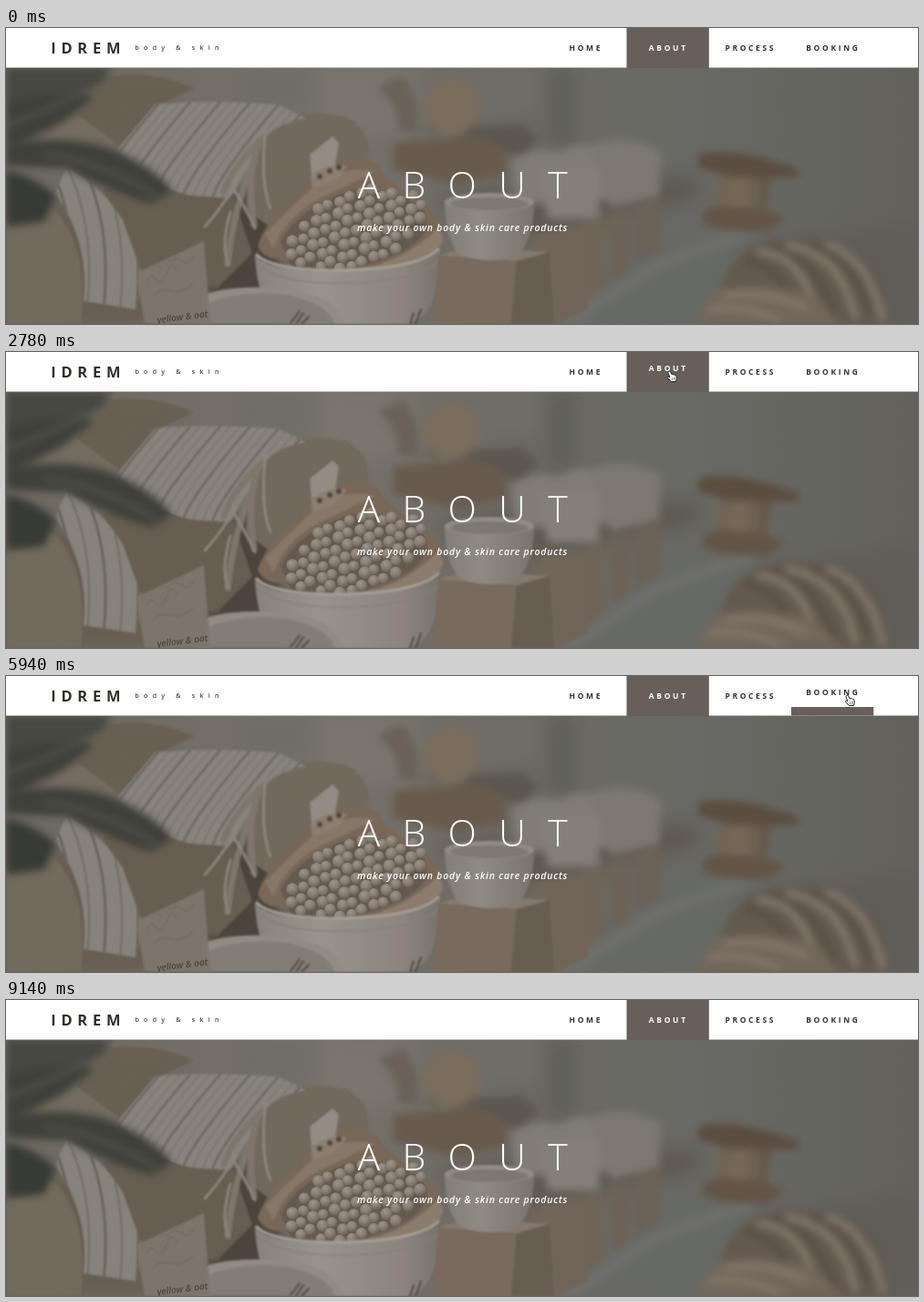
These frames come from a looping animation (1000x325 px, 9.16 s). An HTML page:

```html
<!DOCTYPE html>
<html lang="en">
<head>
<meta charset="utf-8">
<title>Body and skin: about</title>
<style>
  html, body { margin: 0; width: 100%; height: 100%; overflow: hidden; background: #67665f; }
  svg { display: block; width: 100%; height: 100%; }
  text { font-family: "Open Sans", sans-serif; }
  .photo { filter: saturate(.75) brightness(.95); }
  .logo { font-size: 16.5px; font-weight: 700; letter-spacing: 5.7px; fill: #33302a; }
  .claim { font-size: 7px; font-weight: 600; letter-spacing: 5.25px; fill: #494640; }
  .nav text { font-size: 8.5px; font-weight: 700; letter-spacing: 2.65px; fill: #33312d; }
  .nav .active text { fill: #fff; }
  .title { font-size: 41px; font-weight: 300; letter-spacing: 24.4px; fill: #fff; }
  .sub { font-size: 10.5px; font-weight: 600; font-style: italic; letter-spacing: .81px; fill: #fff; }
  .note { font-size: 10px; font-weight: 600; font-style: italic; fill: #514a42; }
  .line { fill: none; stroke-linecap: round; }
</style>
</head>
<body>
<svg viewBox="0 0 1000 325" preserveAspectRatio="none">
  <defs>
    <filter id="soft" x="-20%" y="-20%" width="140%" height="140%" color-interpolation-filters="sRGB"><feGaussianBlur stdDeviation="1.2"/></filter>
    <filter id="blur" x="-20%" y="-20%" width="140%" height="140%" color-interpolation-filters="sRGB"><feGaussianBlur stdDeviation="4"/></filter>
    <filter id="haze" x="-20%" y="-20%" width="140%" height="140%" color-interpolation-filters="sRGB"><feGaussianBlur stdDeviation="10"/></filter>
    <linearGradient id="wall">
      <stop offset="0" stop-color="#6d685f"/><stop offset=".35" stop-color="#76716a"/>
      <stop offset=".58" stop-color="#6b6962"/><stop offset=".75" stop-color="#696a65"/>
      <stop offset="1" stop-color="#62615b"/>
    </linearGradient>
    <linearGradient id="bowl">
      <stop offset="0" stop-color="#91897f"/><stop offset=".35" stop-color="#a19a90"/>
      <stop offset=".8" stop-color="#948c82"/><stop offset="1" stop-color="#81796f"/>
    </linearGradient>
    <linearGradient id="jar">
      <stop offset="0" stop-color="#8b847a"/><stop offset=".4" stop-color="#989187"/>
      <stop offset="1" stop-color="#827a70"/>
    </linearGradient>
    <linearGradient id="spool">
      <stop offset="0" stop-color="#786650"/><stop offset=".45" stop-color="#836f58"/>
      <stop offset="1" stop-color="#665744"/>
    </linearGradient>
    <radialGradient id="knob" cx=".4" cy=".3" r=".7">
      <stop offset="0" stop-color="#a89c8e"/><stop offset=".55" stop-color="#928475"/>
      <stop offset="1" stop-color="#766858"/>
    </radialGradient>
    <pattern id="weave" width="5" height="4" patternUnits="userSpaceOnUse" patternTransform="rotate(-18)">
      <path d="M0 1h3M2 3h3" stroke="#50483d" stroke-opacity=".28"/>
      <path d="M1 2h3" stroke="#a1947f" stroke-opacity=".25"/>
    </pattern>
    <clipPath id="hero"><path d="M0 43.5H1000V325H0z"/></clipPath>
    <clipPath id="towelShape"><path id="towel" d="M163 84Q220 78 298 84L329 99Q289 106 280 128Q266 158 245 187L203 184Q163 176 122 134Z"/></clipPath>
    <clipPath id="pillowShape"><path id="pillow" d="M66 154Q102 169 128 211L151 274L143 309L85 300Q92 236 54 181Z"/></clipPath>
  </defs>

  <g clip-path="url(#hero)">
    <path d="M0 43H1000V325H0z" fill="url(#wall)"/>

    <g class="photo">
      <g filter="url(#haze)">
        <path d="M250 43H590V88H250z" fill="#77736b"/>
        <path d="M340 43H450V118H340z" fill="#827b71"/>
        <path d="M595 43H622V130H595z" fill="#63635c"/>
        <path d="M0 195H300V325H0z" fill="#706252"/>
        <path d="M225 185H300V325H225z" fill="#51483d"/>
        <path d="M640 235L820 205L830 325H550z" fill="#6c6f6a"/>
        <path d="M830 235L1000 210V325H770z" fill="#67625a"/>
        <path d="M470 185L760 160V190L530 240z" fill="#675e54"/>
      </g>

      <g filter="url(#blur)">
        <path d="M425 126L520 117L548 128V161L495 172L424 156z" fill="#725f4b"/>
        <path d="M450 111L565 105L585 122L560 145L528 122z" fill="#635b51"/>
        <circle cx="489" cy="86" r="31" fill="#84725b"/>
        <path d="M430 113Q430 82 407 65L435 52Q457 78 451 116z" fill="#70675b"/>
        <path d="M555 143Q589 129 609 139V193H558zM606 137Q633 120 666 136V188H607z" fill="#89827a"/>
        <path d="M640 130Q678 113 718 136L716 184L663 197z" fill="#857e76"/>
        <path d="M585 155H650V209H594z" fill="#8d867d"/>
        <path d="M577 228L622 218V322H590z" fill="#7c6b59"/>
        <path d="M626 218L656 209V287L634 302z" fill="#796957"/>
        <path d="M660 206L684 199V268L665 278z" fill="#766857"/>
        <path d="M688 195L718 186V244L690 258z" fill="#746759"/>
        <path class="line" d="M620 321L713 261L811 225" stroke="#737571" stroke-width="14"/>
        <path d="M759 138Q804 130 868 155L870 164L797 164L759 153z" fill="#64503e"/>
        <path d="M780 164H839L833 207Q802 215 781 202z" fill="url(#spool)"/>
        <path d="M766 199Q804 191 855 207L838 222Q796 228 763 214z" fill="#6c5844"/>
      </g>

      <!-- basket of brushes -->
      <g filter="url(#blur)">
        <path d="M784 286Q798 238 841 234Q917 222 957 273L970 325H760z" fill="#6b5d4e"/>
        <path class="line" d="M827 246Q872 248 889 315M857 239Q914 246 931 317M901 239Q946 253 961 319" stroke="#8b7d6d" stroke-width="8"/>
        <path class="line" d="M811 255Q848 258 861 304M842 241Q888 252 910 319M884 240Q926 247 946 310" stroke="#574c40" stroke-width="4"/>
        <path d="M778 290Q820 274 887 295L918 325H754z" fill="#7d6c5a"/>
        <path class="line" d="M788 294Q833 287 878 308M770 309Q810 303 848 322" stroke="#988976" stroke-width="4"/>
      </g>

      <!-- burlap -->
      <g filter="url(#soft)">
        <path d="M47 82Q119 57 169 84L132 134L76 157L28 124z" fill="#7e7364"/>
        <path d="M92 58Q148 40 206 66L165 86L124 129L78 95z" fill="#716553"/>
        <path d="M279 110Q313 85 374 98Q401 113 397 143L350 151L326 201L288 217L262 199z" fill="#7d705f"/>
        <path d="M0 183Q39 182 62 210Q92 256 82 325H0z" fill="#7e715f"/>
        <path d="M106 177Q173 168 250 188L270 247L232 285L151 276z" fill="#706352"/>
        <path d="M0 183Q39 182 62 210Q92 256 82 325H0zM279 110Q313 85 374 98Q401 113 397 143L350 151L326 201L288 217L262 199zM106 177Q173 168 250 188L270 247L232 285L151 276zM47 82Q119 57 206 66L132 134L76 157L28 124z" fill="url(#weave)"/>
      </g>

      <!-- striped cloth -->
      <g filter="url(#soft)">
        <use href="#towel" fill="#918a81"/>
        <g id="towelStripes" class="line" clip-path="url(#towelShape)" stroke="#716c64"/>
        <path class="line" d="M279 123Q247 155 239 180M276 130Q264 162 272 216M273 145Q250 193 243 259" stroke="#857c6f" stroke-width="7"/>
        <path class="line" d="M285 110Q278 169 290 198M250 177Q266 204 273 220M242 187Q226 210 218 218M246 202Q235 239 244 260" stroke="#958b7d" stroke-width="3"/>
        <use href="#pillow" fill="#8f897f"/>
        <g id="pillowStripes" class="line" clip-path="url(#pillowShape)" stroke="#67645c"/>
      </g>

      <!-- leaves -->
      <g filter="url(#blur)" fill="#41443a">
        <path d="M0 43H116Q105 68 62 85Q30 96 0 130z" fill="#4b4c43"/>
        <path d="M0 83Q52 68 96 75Q61 113 0 130z"/>
        <path d="M0 130Q48 116 104 129Q158 148 182 178L160 193Q103 176 67 154L0 151z"/>
        <path d="M0 157Q26 160 55 184L42 213L0 218z" fill="#3a3e36"/>
        <path class="line" d="M0 107Q51 88 113 57M42 139Q100 145 164 184" stroke="#606357" stroke-width="3"/>
      </g>

      <!-- jar and boxes -->
      <g filter="url(#soft)">
        <path d="M474 250L501 243L596 246L601 325H469z" fill="#7c6b5a"/>
        <path d="M474 250L560 256L554 325H468z" fill="#826f5d"/>
        <path d="M560 256L596 246L601 325H554z" fill="#716151"/>
        <path d="M474 250L504 240L596 246L560 256z" fill="#907f6e"/>
        <path d="M600 231L635 225L638 309L604 323z" fill="#7b6a59"/>
        <path d="M481 190H579Q579 231 562 249Q530 261 498 249Q481 233 481 190z" fill="url(#jar)"/>
        <ellipse cx="530" cy="191" rx="49" ry="10" fill="#9a938a"/>
        <ellipse cx="530" cy="193" rx="43" ry="7" fill="#857e75"/>
      </g>

      <!-- brush -->
      <g filter="url(#soft)">
        <path d="M276 239Q285 210 320 183Q348 145 382 142Q407 142 414 161L460 197Q489 220 468 242Q439 266 390 267L306 254Q282 255 276 239z" fill="#846c56"/>
        <path d="M284 226Q312 198 337 174Q369 149 405 158L342 188Q305 209 293 243z" fill="#927c67"/>
        <path d="M333 139L358 119L365 126L361 151L335 163z" fill="#9b9389"/>
        <path d="M334 162Q352 147 374 151L363 166L336 177z" fill="#988371"/>
        <g fill="#574a3e"><circle cx="344" cy="163" r="3"/><circle cx="355" cy="157" r="3"/><circle cx="365" cy="153" r="3"/></g>
        <path d="M301 235Q321 196 379 178Q436 174 459 202Q471 229 427 249Q369 275 313 263z" fill="#6d5e4f"/>
      </g>
      <g id="knobs" fill="url(#knob)"/>
      <path d="M383 265Q434 259 473 220Q489 235 462 250Q430 269 383 268z" fill="#98826d" filter="url(#soft)"/>

      <!-- bowls -->
      <g filter="url(#soft)">
        <path d="M273 248Q282 267 357 267Q451 267 475 242L471 288Q465 318 440 325H300Q275 302 273 248z" fill="url(#bowl)"/>
        <path class="line" d="M275 249Q290 265 357 266Q449 266 474 243" stroke="#afa89e" stroke-width="3"/>
        <path class="line" d="M275 260Q306 283 382 280Q449 277 473 257" stroke="#8d857a" stroke-width="1.5"/>
        <path d="M211 295Q248 280 310 287Q366 296 370 325H211z" fill="#9a9288"/>
        <path d="M222 302Q261 287 308 293Q354 303 360 325H222z" fill="#8b837a"/>
        <path class="line" d="M312 324L322 311M318 325L326 313M324 325L332 317M443 325L447 313M449 325L455 309" stroke="#5a4d40" stroke-width="2"/>
      </g>

      <!-- card -->
      <g filter="url(#soft)">
        <path d="M143 269L217 234L224 325H152z" fill="#867a6d"/>
        <path class="line" d="M154 279Q159 267 164 276T176 269T187 266M176 260Q185 249 193 256T207 249M161 294Q171 285 181 289T205 281" stroke="#74695e"/>
      </g>
      <text class="note" transform="translate(166 324) rotate(-7)">yellow &amp; oat</text>
    </g>

    <text class="title" x="385.5" y="187">ABOUT</text>
    <text class="sub" x="385" y="223">make your own body &amp; skin care products</text>
  </g>

  <path d="M0 0H1000V43.5H0z" fill="#fff"/>
  <text class="logo" x="49.3" y="28">IDREM</text>
  <text class="claim" x="141.5" y="24">body &amp; skin</text>
  <g class="nav" id="nav"></g>
  <g id="cursor">
    <path d="M1.4 1Q2.7 0 3.7 1.3L5 4.2Q6.2 3.4 6.8 4.5Q8 3.8 8.6 5Q9.8 4.7 10 6L10.4 9L9.4 12H4.4L.6 8.2Q-.3 6.8 1.1 6.5L2.8 7.2L1 2.3Q.8 1.5 1.4 1z" fill="#fff" stroke="#222" stroke-width="1" stroke-linejoin="round"/>
    <path d="M5.4 8v2.3M7.1 7.8v2.3M8.6 7.6v2.3" stroke="#333" stroke-width=".6"/>
  </g>
</svg>

<script>
const LOOP = 9160;
const EASE_MS = 300;
const byId = id => document.getElementById(id);

function add(parent, tag, attrs, content = "") {
  const el = document.createElementNS("http://www.w3.org/2000/svg", tag);
  for (const [name, value] of Object.entries(attrs)) el.setAttribute(name, value);
  el.textContent = content;
  parent.append(el);
  return el;
}

// Curved cloth stripes
for (let i = 0; i < 17; i++) {
  const x = 124 + i * 11;
  add(byId("towelStripes"), "path", {
    d: `M${x + 48} 78Q${x + 18} 112 ${x - 6} 145T${x - 31} 193`,
    "stroke-width": i % 3 ? 1 : 2.4
  });
}
for (let i = 0; i < 5; i++) {
  const x = 45 + i * 18;
  add(byId("pillowStripes"), "path", {
    d: `M${x} 145Q${x + 36} 211 ${x + 26} 310`,
    "stroke-width": i % 2 ? 1.2 : 2.4
  });
}

// Wooden knobs, packed in a tilted oval
const tilt = -0.36;
for (let row = -3; row <= 3; row++) {
  for (let col = -6; col <= 6; col++) {
    const u = (col + (row & 1) / 2) * 12.8;
    const v = row * 11.8;
    if ((u / 78) ** 2 + (v / 40) ** 2 > 1) continue;
    add(byId("knobs"), "circle", {
      cx: 384 + u * Math.cos(tilt) - v * Math.sin(tilt) + Math.sin(row * 7 + col * 3),
      cy: 221 + u * Math.sin(tilt) + v * Math.cos(tilt) + Math.cos(row * 5 + col * 4),
      r: 6.2 + Math.sin(col * 9 + row) * 0.5
    });
  }
}

const items = [
  { label: "HOME", x: 617.5, left: 590.4, on: 1420, off: 2300 },
  { label: "ABOUT", x: 704.8, left: 680.5, on: 2300, off: 3320, active: true },
  { label: "PROCESS", x: 788.4, left: 770.7, on: 3320, off: 4630 },
  { label: "BOOKING", x: 877.2, left: 861, on: 4630, off: 6140 }
];
for (const item of items) {
  const group = add(byId("nav"), "g", item.active ? { class: "active" } : {});
  const tab = { x: item.left, width: 90.3, fill: "#675f59" };
  if (item.active) add(group, "rect", { ...tab, y: 0, height: 44 });
  else item.bar = add(group, "rect", tab);
  item.text = add(group, "text", { x: item.x, y: 24.6 }, item.label);
}

// Pointer stops: time, x, y
const stops = [
  [1000, 640, 340], [1480, 650.5, 21], [2150, 650.5, 21],
  [2440, 725, 20.5], [3170, 725, 20.5], [3460, 815, 21],
  [4430, 815, 21], [4650, 911, 21], [5000, 920, 20.5],
  [6080, 920, 20.5], [6650, 912, 340]
];

const clamp = v => Math.max(0, Math.min(1, v));
const smooth = v => v * v * (3 - 2 * v);
const ramp = (t, start, length) => smooth(clamp((t - start) / length));

function pointerAt(t) {
  let [, x, y] = stops[0];
  for (let i = 1; i < stops.length; i++) {
    const [from, x0, y0] = stops[i - 1];
    const [to, x1, y1] = stops[i];
    const k = ramp(t, from, to - from);
    x += (x1 - x0) * k;
    y += (y1 - y0) * k;
  }
  return [x, y];
}

function draw(now) {
  const t = now % LOOP;
  for (const { bar, text, on, off } of items) {
    const lift = ramp(t, on, EASE_MS) - ramp(t, off, EASE_MS);
    bar?.setAttribute("y", 43.5 - 9.5 * lift);
    bar?.setAttribute("height", 9.5 * lift);
    text.setAttribute("transform", `translate(0 ${-3.2 * lift})`);
  }
  byId("cursor").setAttribute("transform", `translate(${pointerAt(t)})`);
}

const start = performance.now();
function tick() {
  draw(performance.now() - start);
  requestAnimationFrame(tick);
}
tick();
</script>
</body>
</html>
```
